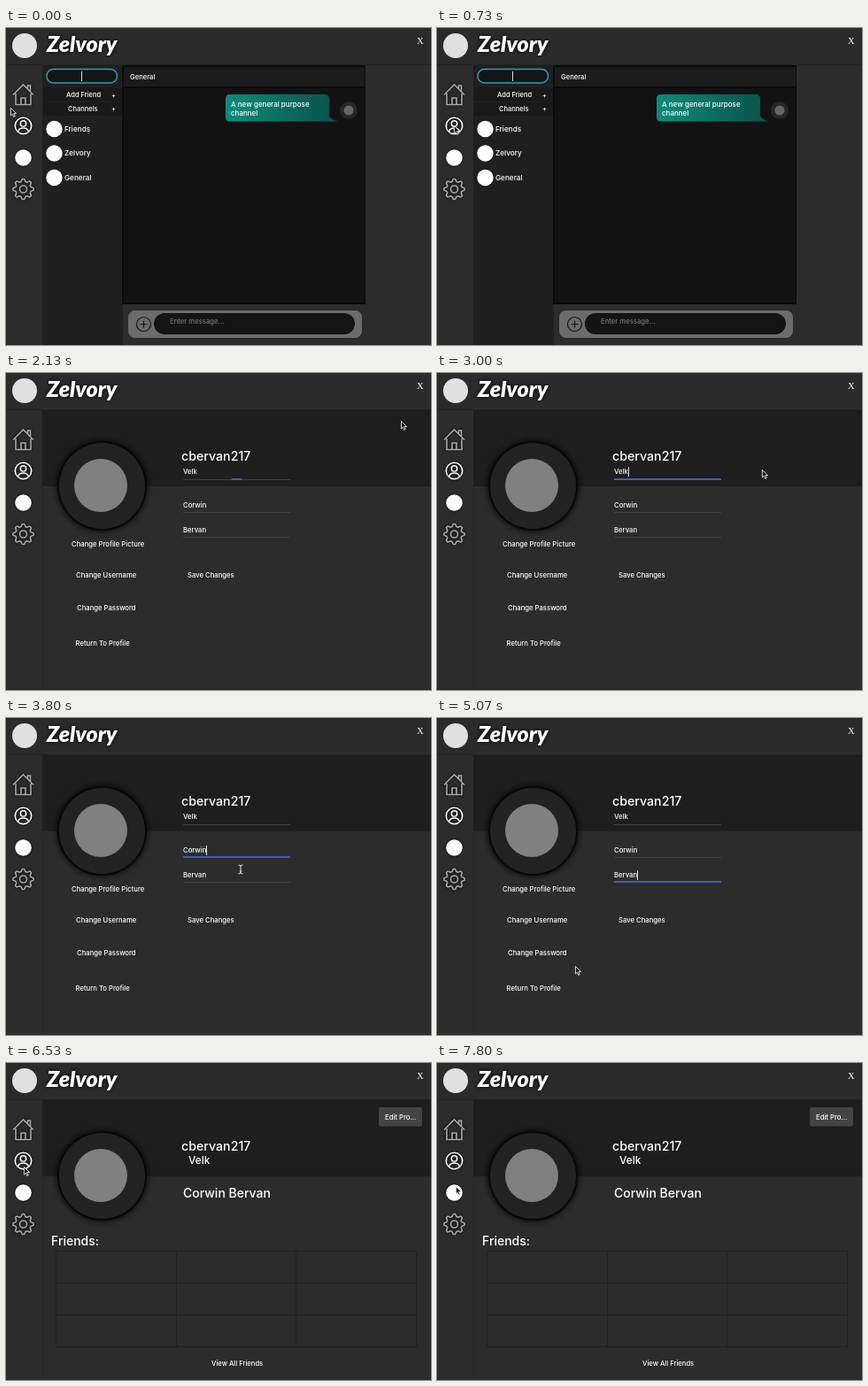
Recreate the animation shown at these times as an HTML page with a canvas. Size 480x358 px, loop 8 s.

```html
<!DOCTYPE html>
<html lang="en">
<head>
<meta charset="utf-8">
<title>Chat client</title>
<style>
  html, body { margin: 0; width: 100%; height: 100%; overflow: hidden; background: #2b2b2b; }
  canvas { display: block; }
</style>
</head>
<body>
<canvas id="stage" width="480" height="358"></canvas>
<script>
const ctx = document.getElementById('stage').getContext('2d');
const LOOP = 8000;
const APP = 'Zelvory', USER = 'cbervan217', NICK = 'Velk', FIRST = 'Corwin', LAST = 'Bervan';
const OPEN_PROFILE = 860, OPEN_EDITOR = 2060, CLOSE_EDITOR = 5440;
const ICON = '#a8a8a8';

// Pointer keys: time, x, y
const pointerKeys = [
  [0, 5, 90], [70, 5, 90], [730, 19, 110], [1270, 19, 110], [1900, 446, 54],
  [2560, 446, 54], [3000, 367, 109], [3150, 367, 109], [3450, 290, 150],
  [3800, 265, 171], [4000, 265, 187], [4070, 265, 187], [4330, 262, 177],
  [4810, 262, 177], [5070, 156, 280], [5300, 128, 303], [5940, 128, 303],
  [6500, 20, 117], [7070, 20, 117], [7400, 23, 124], [7780, 21, 139], [LOOP, 21, 139]
];

const fields = [
  { value: NICK, y: 111, line: 120.5, focus: 2110, blur: 3470, caret: [2600, 3200] },
  { value: FIRST, y: 149, line: 157.5, focus: 3470, blur: 4480, caret: [3530, 4130] },
  { value: LAST, y: 177, line: 185.5, focus: 4480, blur: CLOSE_EDITOR, caret: [4560, 5130] }
];

const clamp = v => Math.max(0, Math.min(1, v));

function pointerAt(t) {
  const i = Math.max(1, pointerKeys.findIndex(k => k[0] > t));
  const [t0, x0, y0] = pointerKeys[i - 1], [t1, x1, y1] = pointerKeys[i];
  const p = clamp((t - t0) / (t1 - t0)), e = p * p * (3 - 2 * p);
  return [x0 + (x1 - x0) * e, y0 + (y1 - y0) * e];
}

function rect(x, y, w, h, fill) {
  ctx.fillStyle = fill;
  ctx.fillRect(x, y, w, h);
}

function pill(x, y, w, h, r, fill, stroke, width = 1) {
  ctx.beginPath();
  ctx.roundRect(x, y, w, h, r);
  paint(fill, stroke, width);
}

function circle(x, y, r, fill, stroke, width = 1) {
  ctx.beginPath();
  ctx.arc(x, y, r, 0, 7);
  paint(fill, stroke, width);
}

function path(d, fill, stroke, width = 1) {
  const p = new Path2D(d);
  if (fill) { ctx.fillStyle = fill; ctx.fill(p); }
  if (stroke) { ctx.strokeStyle = stroke; ctx.lineWidth = width; ctx.stroke(p); }
}

function paint(fill, stroke, width) {
  if (fill) { ctx.fillStyle = fill; ctx.fill(); }
  if (stroke) { ctx.strokeStyle = stroke; ctx.lineWidth = width; ctx.stroke(); }
}

function line(x0, y0, x1, y1, color, width = 1) {
  ctx.beginPath();
  ctx.moveTo(x0, y0);
  ctx.lineTo(x1, y1);
  paint(null, color, width);
}

// y is the middle of the capitals
function text(s, x, y, size = 7.7, color = '#fff', font = 'Inter, sans-serif', style = '500') {
  ctx.font = `${style} ${size}px ${font}`;
  ctx.fillStyle = color;
  ctx.fillText(s, x, y + size * 0.36);
}

function shadowed(blur, draw) {
  ctx.save();
  ctx.shadowColor = '#000';
  ctx.shadowBlur = blur;
  draw();
  ctx.restore();
}

function drawGear(x, y) {
  ctx.beginPath();
  for (let i = 0; i < 32; i++) {
    const a = (i - 1.5) * Math.PI / 16, r = i % 4 === 1 || i % 4 === 2 ? 11.6 : 8.8;
    ctx.lineTo(x + r * Math.cos(a), y + r * Math.sin(a));
  }
  ctx.closePath();
  ctx.lineJoin = 'round';
  paint(null, ICON, 1.6);
  circle(x, y, 4, null, ICON, 1.6);
}

function drawFrame() {
  rect(0, 0, 480, 358, '#2c2c2c');
  rect(0, 0, 480, 41, '#2b2b2b');
  rect(0, 41, 480, 1, '#222');
  rect(41, 42, 1, 316, '#282828');
  circle(21, 20, 14, '#e0e0e0');
  shadowed(5, () => text(APP, 46, 18, 25, '#fff', 'Lato, sans-serif', 'italic 900'));
  text('X', 464, 14, 10.5, '#fff', '"Liberation Serif", serif');

  shadowed(3, () => {
    path('M8 75.5 L19.5 64 L31 75.5 M11 74 V86.5 H28 V74 M17 86.5 V79 H22 V86.5 M24.5 69 V65 H27.5 V72',
      null, ICON, 1.6);
    circle(19.5, 110.5, 9.2, null, '#fff', 1.6);
    circle(19.5, 108, 3.2, null, '#fff', 1.5);
    path('M13.5 117 C14.5 111.5 24.5 111.5 25.5 117', null, '#fff', 1.5);
    circle(19.5, 146.5, 9.3, '#fff');
    drawGear(19.5, 182);
  });
}

function drawChat(t) {
  rect(41, 42, 91, 316, '#1f1f1f');
  rect(131, 42, 275, 270, '#0b0b0b');
  rect(133, 44, 272, 22, '#1b1b1b');
  rect(133, 68, 272, 242, '#121212');
  rect(132, 312, 274, 46, '#2c2c2c');

  pill(46, 46.5, 79.5, 15.5, 7.5, '#151515', '#2a9fc0', 1.4);
  if (t < 200 || t > 700) rect(85, 49, 1, 11, '#ddd');
  rect(42, 67, 89, 16, '#191919');
  rect(42, 84, 89, 15, '#191919');
  text('Add Friend', 68, 75.5, 7.5);
  text('+', 119, 76, 7.5);
  text('Channels', 70, 91, 7.5);
  text('+', 119, 91.5, 7.5);
  ['Friends', APP, 'General'].forEach((name, i) => {
    const y = 114 + i * 27.5;
    circle(54.5, y, 9.2, '#fff');
    text(name, 66, y, 8.2);
  });

  text('General', 140, 55, 7.6);
  const teal = ctx.createLinearGradient(248, 0, 375, 0);
  teal.addColorStop(0, '#0d8c7a');
  teal.addColorStop(1, '#095047');
  path('M253 75 H360 Q365 75 365 80 V99 Q367 104 376 105.5 H253 Q248 105.5 248 100.5 V80 Q248 75 253 75 Z', teal);
  text('A new general purpose', 254, 86, 8);
  text('channel', 254, 96, 8);
  circle(387, 93, 10, '#262626');
  circle(387, 93, 5.5, '#666');

  pill(138, 319, 264, 31, 8, '#6c6c6c');
  circle(155.5, 334.5, 8, null, '#151515', 1.2);
  path('M151.5 334.5 H159.5 M155.5 330.5 V338.5', null, '#151515', 1.2);
  pill(167, 322, 227, 24, 12, '#141414');
  text('Enter message...', 185, 331, 7.7, '#777');
}

function drawBanner() {
  rect(41, 42, 439, 86, '#1e1e1e');
  shadowed(9, () => circle(108.5, 127.5, 50.5, '#080808'));
  circle(108.5, 127.5, 48.5, '#222');
  circle(107, 127, 30, '#808080');
  text(USER, 198, 93.5, 14.2);
}

function drawProfile(t, [px, py]) {
  drawBanner();
  const hovered = px > 421 && px < 470 && py > 50 && py < 71;
  const glow = t >= CLOSE_EDITOR ? clamp((t - CLOSE_EDITOR) / 300) : +hovered;
  if (glow) pill(421, 50, 49, 21.5, 2, `rgba(68, 68, 68, ${glow})`);
  text('Edit Pro...', 428, 61);
  text(NICK, 206, 110, 11.8);
  text(`${FIRST} ${LAST}`, 200, 146.5, 14);
  text('Friends:', 51, 200.5, 14);
  for (let i = 0; i < 4; i++) {
    const x = 56.5 + Math.round(i * 135.7), y = 212.5 + i * 36;
    line(56, y, 464, y, '#212121');
    line(x, 212, x, 321, '#212121');
  }
  text('View All Friends', 232, 339, 7.6);
}

function drawEditor(t) {
  drawBanner();
  for (const { value, y, line: ly, focus, blur, caret } of fields) {
    text(value, 200, y);
    line(200, ly, 321, ly, '#414141');
    if (t >= focus && t < blur) {
      const half = 60.5 * clamp((t - focus) / 220);
      line(260.5 - half, ly - 0.5, 260.5 + half, ly - 0.5, '#3f5fb4', 2);
    }
    if (t >= caret[0] && t < caret[1])
      rect(Math.round(200 + ctx.measureText(value).width), y - 5, 1, 11, '#ddd');
  }
  text('Change Profile Picture', 74, 193);
  text('Change Username', 79, 228);
  text('Change Password', 80, 265.5);
  text('Return To Profile', 78.5, 305);
  text('Save Changes', 205, 228);
}

function drawPointer([x, y], editing) {
  const overField = editing && x > 200 && x < 321 && fields.some(f => y > f.y - 7 && y < f.line + 1);
  ctx.save();
  ctx.translate(x, y);
  if (overField) {
    path('M-2.5 -5 Q0 -5 0 -3.5 Q0 -5 2.5 -5 M0 -4 V4 M-2.5 5 Q0 5 0 3.5 Q0 5 2.5 5 M-1.2 2 H1.2', null, '#e8e8e8', 1);
  } else {
    path('M0.4 0.4 V9 L2.3 7.2 L3.7 10.4 L5.2 9.7 L3.8 6.6 H6.5 Z', '#111', '#eee', 0.9);
  }
  ctx.restore();
}

function render(now) {
  const t = now % LOOP;
  const pointer = pointerAt(t);
  const editing = t >= OPEN_EDITOR && t < CLOSE_EDITOR;
  drawFrame();
  if (t < OPEN_PROFILE) drawChat(t);
  else if (editing) drawEditor(t);
  else drawProfile(t, pointer);
  drawPointer(pointer, editing);
}

const start = performance.now();
function tick() {
  render(performance.now() - start);
  requestAnimationFrame(tick);
}
tick();
</script>
</body>
</html>
```
